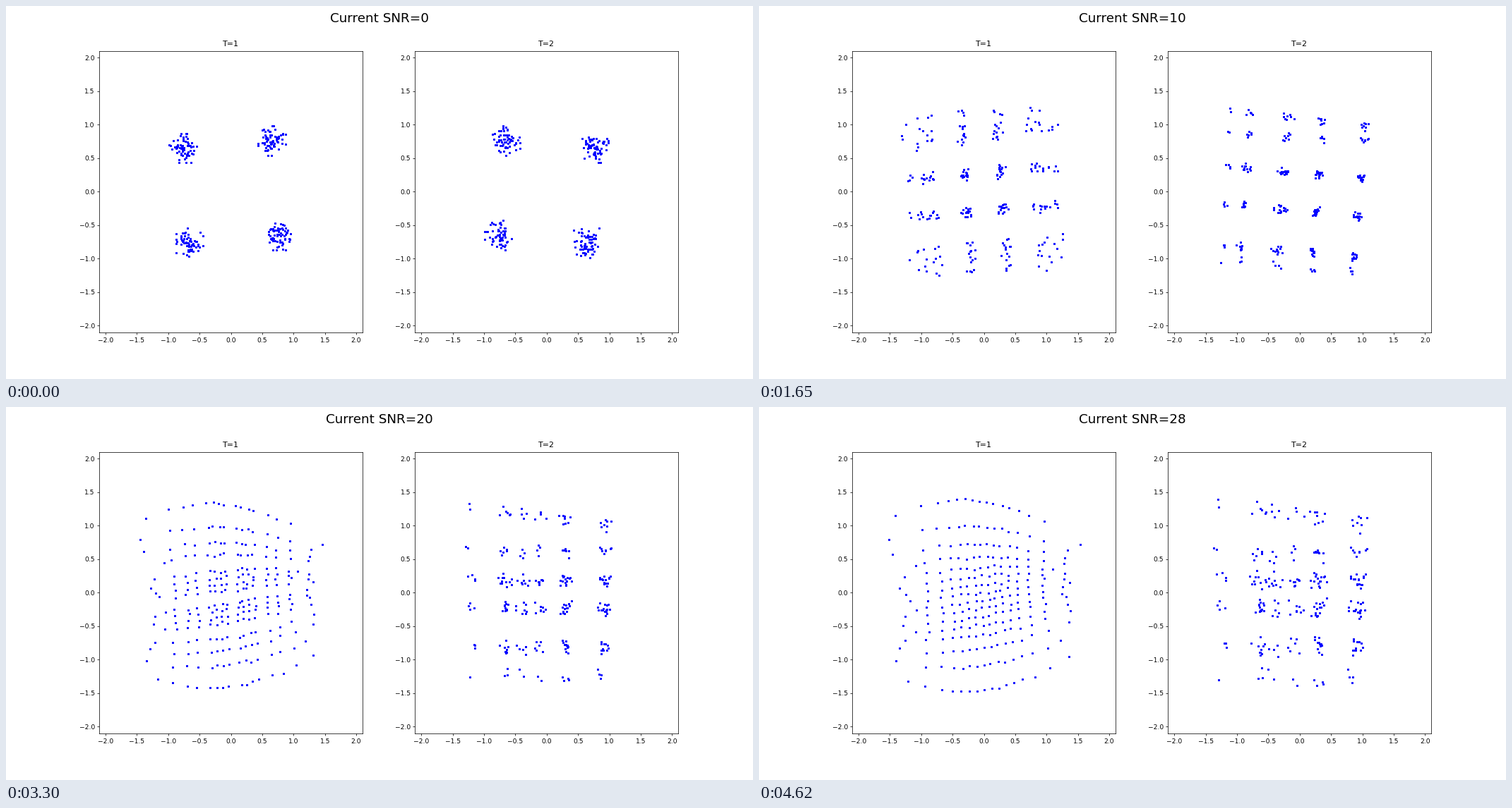
A matplotlib script for the animation above (4950 ms loop, 1058 by 529 pixels).

```python
import numpy as np
import matplotlib.pyplot as plt
from matplotlib.animation import FuncAnimation

DPI = 66.125
PX = 72 / DPI  # one pixel in points
FRAMES = 15
STEP = 330

ROW, COL = np.mgrid[0:16, 0:16]
OUTER_X = np.isin(COL // 4, [0, 3])
OUTER_Y = np.isin(ROW // 4, [0, 3])

# Stages: four clouds, sixteen clouds, loose blocks, full constellation
STAGES = [0, 3, 5, 7, 10, 12, 14]
INNER = [.71, .39, .28, .25, .25, .25, .25]
OUTER = [.71, .92, .95, .96, .96, .96, .96]
SPREAD = [0, .1, .23, .42, .78, .95, 1]


def block_means(z):
    return np.kron(z.reshape(4, 4, 4, 4).mean(axis=(1, 3)), np.ones((4, 4)))


def scatter(rng, size=1):
    x, y = rng.normal(size=(2, 16, 16)).clip(-2.2, 2.2)
    return size * (x + 1j * y)


def warped_grid(rng):
    """A bulging, slightly twisted grid that is densest in the middle."""
    def space(t):
        return .78 * t + .1 * t**3 + .37 * t**5
    u, v = COL / 7.5 - 1, 1 - ROW / 7.5
    x = space(u) * (1 + .08 * v**2) + .02 - .04 * v
    x += np.where(abs(u) == 1, rng.normal(0, .09, u.shape), 0)
    tilt = .13 - .125 * v - .135 * v**2
    y = 1.12 * space(v) * (1 - .13 * x**2) - .05 + tilt * x
    return x + 1j * y


def clumped_grid(rng):
    """Points gathered around the crossings of a coarse, uneven lattice."""
    x = np.repeat([-1.25, -.65, -.42, -.08, .3, .92], [1, 3, 2, 2, 4, 4])[COL]
    y = np.repeat([1.15, .6, .18, -.23, -.8, -1.28], [2, 2, 4, 4, 3, 1])[ROW]
    return x + 1j * (y - np.where(ROW < 2, .12 * x, 0))


class Constellation:
    def __init__(self, seed, grid, turn, noise):
        rng = np.random.default_rng(seed)
        final = grid(rng)
        self.mean = block_means(final)
        self.offset = final - self.mean
        self.jitter = scatter(rng)
        self.turn = np.exp(1j * turn)
        self.noise = noise

    def at(self, k):
        inner, outer, spread, noise = (
            np.interp(k, STAGES, values) for values in (INNER, OUTER, SPREAD, self.noise))
        level = np.array([-outer, -inner, inner, outer])
        centre = (level[COL // 4] - 1j * level[ROW // 4]) * self.turn
        settle = np.interp(k, [7, 10], [0, 1])
        z = centre + settle * (self.mean - centre) + noise * self.jitter
        # Outer blocks open up earlier than inner ones
        x = z.real + spread ** np.where(OUTER_X, .5, 1) * self.offset.real
        y = z.imag + spread ** np.where(OUTER_Y, .5, 1) * self.offset.imag
        return x.ravel(), y.ravel()


clouds = [
    Constellation(4, warped_grid, .08, [.1, .05, .03, .022, .014, .012, .012]),
    Constellation(9, clumped_grid, -.08, [.1, .05, .032, .03, .05, .06, .07]),
]

plt.rcParams.update({"font.family": "DejaVu Sans", "font.size": 10})
fig, axes = plt.subplots(1, 2, figsize=(16, 8), dpi=DPI)
fig.subplots_adjust(left=.125, right=.9, bottom=.125, top=.8793, wspace=.2)
heading = fig.suptitle("", fontsize=20, y=.9825)
dots = []
for n, ax in enumerate(axes, 1):
    ax.set(xlim=(-2.1, 2.1), ylim=(-2.1, 2.1))
    ax.set_title(f"T={n}", fontsize=12, pad=7)
    ax.tick_params(axis="x", pad=4)
    dots += ax.plot([], [], "s", color="blue", ms=2 * PX, mew=.95 * PX)


def draw(k):
    heading.set_text(f"Current SNR={2 * k}")
    for line, cloud in zip(dots, clouds):
        line.set_data(*cloud.at(k))
    return [heading, *dots]


anim = FuncAnimation(fig, draw, frames=FRAMES, interval=STEP, repeat=True, repeat_delay=0)
plt.show()
```
